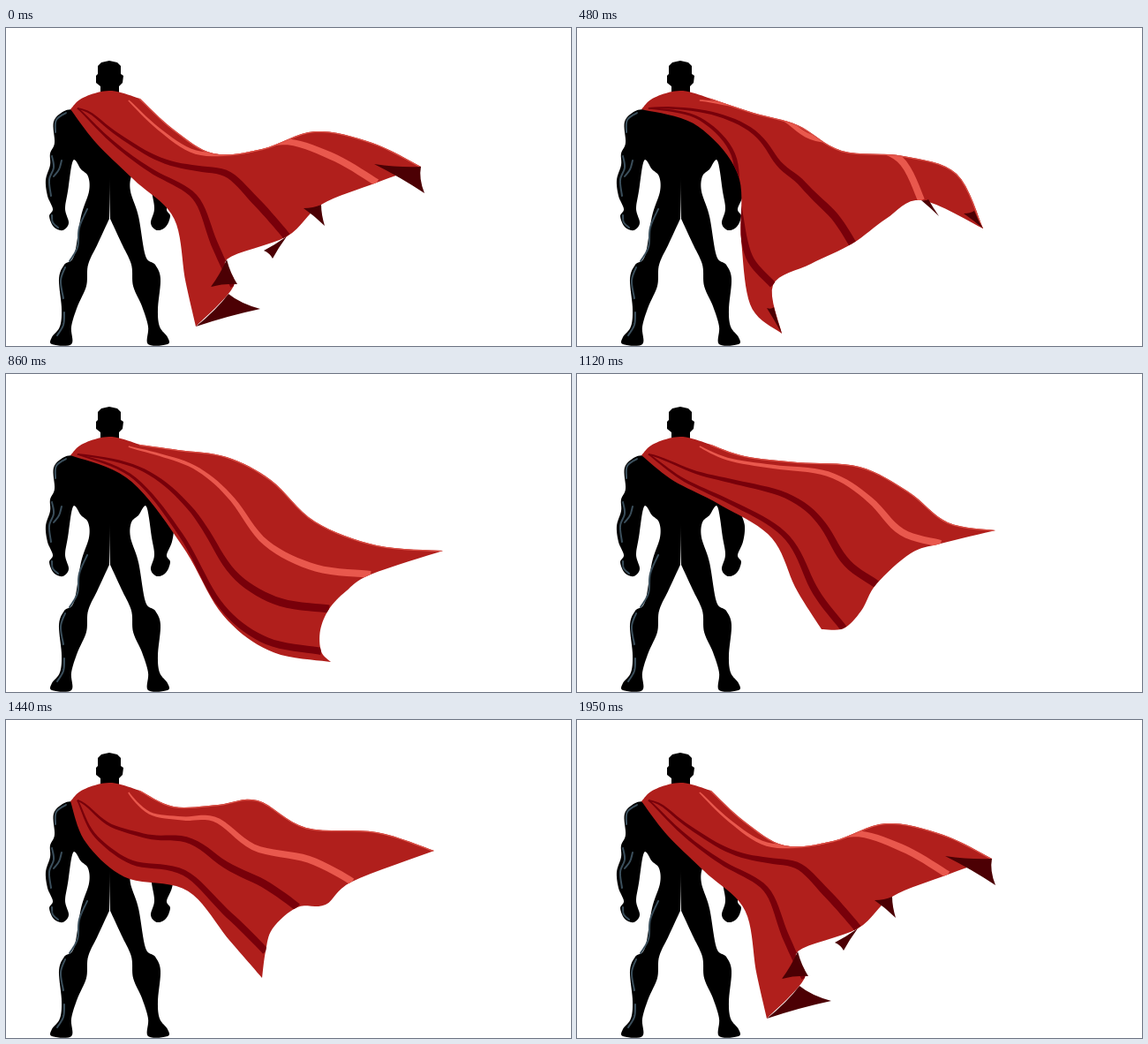
Recreate the animation shown at these times as an HTML page with a canvas. Size 640 px wide and 360 px high, loop 1.98 s.

```html
<!DOCTYPE html>
<html lang="en">
<head>
<meta charset="utf-8">
<title>Cape in the wind</title>
<style>
  html, body { margin: 0; width: 100%; height: 100%; overflow: hidden; background: #fff; }
  canvas { display: block; width: 640px; height: 360px; }
</style>
</head>
<body>
<canvas id="stage" width="640" height="360"></canvas>
<script>
const LOOP = 1980, CYCLE = 37;
const RED = '#b01f1c', DARK = '#78000a', LIGHT = '#e9584d', UNDER = '#4c0004', RIM = '#3b4f5c';
const ctx = document.getElementById('stage').getContext('2d');
const points = s => s.split(' ').map(p => p.split(',').map(Number));
const mix = (a, b, t) => a.map((v, k) => v + (b[k] - v) * t);

// Cape outline at key moments: five points along the top, seven on the hem
// (far tip to low tip), four back up the side.
// A flap is a hem point and two corners of the lining, relative to it.
const poses = [
  { at: 0,
    line: '190,115 235,142 290,137 350,117 415,130 470,157 420,175 357,200 318,236 250,262 258,292 215,338 203,285 190,215 145,172 102,130',
    flaps: [[0, 4, 30, -53, -3], [2, 4, 24, -20, 4], [3, -16, 25, -26, 16], [4, 12, 28, -18, 31], [6, 73, -20, 37, -37]] },
  { at: 9,
    line: '200,96 250,110 300,139 370,145 430,165 460,227 390,195 350,216 312,244 265,267 222,291 232,346 197,315 186,240 182,165 135,110',
    flaps: [[0, -22, -17, -10, -20], [1, 20, 18, 8, -1], [6, -17, -29, -9, -30]] },
  { at: 17,
    line: '195,86 250,94 300,120 350,167 420,194 495,200 413,227 385,246 366,266 356,290 357,314 368,326 300,314 245,272 200,195 140,120' },
  { at: 21,
    line: '190,93 250,100 320,105 375,133 420,168 474,177 412,192 378,203 339,238 322,268 302,288 277,289 248,243 220,185 160,147 108,120' },
  { at: 27,
    line: '190,98 240,96 285,91 340,122 420,127 485,148 392,183 362,209 330,212 302,236 294,262 290,292 252,248 205,193 135,178 90,138' },
  { at: 33,
    line: '190,110 240,119 310,113 360,121 405,147 442,164 398,190 350,203 304,243 290,258 272,272 270,292 222,245 185,192 130,158 98,125',
    flaps: [[1, -25, -7, -14, -10], [6, 38, -25, 10, -29]] }
];
for (const p of poses) p.line = points(p.line);

const collar = points('73,92 87,79 118,71 152,80');
const leftEnd = collar[0], rightEnd = collar[3];

// Catmull-Rom spline through p as a function of 0..1
function spline(p) {
  const last = p.length - 1;
  return s => {
    const i = Math.min(last - 1, Math.floor(s * last)), u = s * last - i;
    const b = p[i], c = p[i + 1], a = p[i - 1] || b, d = p[i + 2] || c;
    return b.map((v, k) => v + u / 2 * (c[k] - a[k]
      + u * (2 * a[k] - 5 * v + 4 * c[k] - d[k] + u * (3 * (v - c[k]) + d[k] - a[k]))));
  };
}
const sample = (f, n = 48) => Array.from({ length: n + 1 }, (_, i) => f(i / n));
const curve = p => sample(spline(p), p.length * 8);

function trace(p) {
  ctx.beginPath();
  for (const q of p) ctx.lineTo(...q);
}
function fill(p, color) {
  trace(p);
  ctx.closePath();
  ctx.fillStyle = color;
  ctx.fill();
}
function stroke(p, color, width) {
  trace(p);
  ctx.strokeStyle = color;
  ctx.lineWidth = width;
  ctx.stroke();
}

// Strip that widens from the collar to the hem
function ribbon(f, width, color) {
  const side = sign => sample(s => {
    const [x, y] = f(s), a = f(Math.max(0, s - .02)), b = f(Math.min(1, s + .02));
    const dx = b[0] - a[0], dy = b[1] - a[1];
    const h = sign * width / 2 * (.2 + .8 * Math.min(1, s * 1.25)) / Math.hypot(dx, dy);
    return [x - dy * h, y + dx * h];
  });
  fill([...side(1), ...side(-1).reverse()], color);
}

// Triangle with edges drawn in towards its middle
function flap(corners, color) {
  const mid = [0, 1].map(k => corners.reduce((sum, c) => sum + c[k], 0) / 3);
  ctx.beginPath();
  ctx.moveTo(...corners[0]);
  corners.forEach((c, i) => {
    const next = corners[(i + 1) % 3];
    ctx.quadraticCurveTo(...mix(mix(c, next, .5), mid, .25), ...next);
  });
  ctx.fillStyle = color;
  ctx.fill();
}

// Hermite blend between neighbouring poses, closed over the cycle
function outline(f) {
  const n = poses.length;
  let i = n - 1;
  while (poses[i].at > f) i--;
  const near = [-1, 0, 1, 2].map(k => poses[(i + k + n) % n].line);
  const time = [-1, 0, 1, 2].map(k => poses[(i + k + n) % n].at + CYCLE * Math.floor((i + k) / n));
  const span = time[2] - time[1], u = (f - time[1]) / span, pull = .75 * span;
  const ease = u * u * (3 - 2 * u);
  const leave = pull * u * (1 - u) ** 2 / (time[2] - time[0]);
  const arrive = pull * u * u * (u - 1) / (time[3] - time[1]);
  const [a, b, c, d] = near;
  return b.map((q, j) => q.map((v, k) =>
    v + (c[j][k] - v) * ease + (c[j][k] - a[j][k]) * leave + (d[j][k] - v) * arrive));
}

function drawCape(frame) {
  const f = frame % CYCLE, line = outline(f), hemPoints = line.slice(5, 12);
  const tip = hemPoints[0], low = hemPoints[6];
  const top = spline([rightEnd, ...line.slice(0, 6)]);
  const side = spline([leftEnd, ...line.slice(11).reverse()]);
  const hem = spline(hemPoints);

  // Place on the cloth: s from collar to hem, v from top edge to side
  const cloth = (s, v) => {
    const inner = mix(top(s), side(s), v), flat = mix(tip, low, v), edge = hem(v);
    return inner.map((x, k) => x + (edge[k] - flat[k]) * s);
  };
  const fold = v => s => cloth(s, v + (.9 - v) * (1 - s) ** 6);

  const front = [...curve(collar), ...sample(top), ...sample(hem), ...sample(side).reverse()];
  fill(front, RED);
  ctx.save();
  trace(front);
  ctx.clip();
  ribbon(fold(5 / 6), 8, DARK);
  ribbon(fold(1 / 2), 9, DARK);
  ribbon(s => cloth(s, 1 / 6), 8, LIGHT);
  stroke(sample(top), '#dc5248', 2.5);
  ctx.restore();

  // The lining shows only around the poses that turn it out
  for (const { at, flaps = [] } of poses) {
    const gap = Math.abs(f - at), open = 1 - Math.min(gap, CYCLE - gap) / 3;
    if (open <= 0) continue;
    for (const [i, ax, ay, bx, by] of flaps) {
      const [x, y] = hemPoints[i];
      flap([[x, y], [x + ax * open, y + ay * open], [x + bx * open, y + by * open]], UNDER);
    }
  }
}

// The body is one half, mirrored; the far shoulder slopes away under the cape
const half = '50,142 50,155 45,172 47,190 53,205 49,213 54,225 64,229 71,221 67,205 70,185 76,150 85,160 93,168 94,185 85,213 77,258 66,268 60,284 63,318 61,338 52,350 52,358 74,358 74,338 81,315 91,292 93,268 104,244 117,216';
const near = curve(points('120,70 100,76 82,90 66,94 54,106 55,130 ' + half));
const far = curve(points('120,70 90,82 75,105 62,125 ' + half)).map(([x, y]) => [235 - x, y]);
const head = points('107,74 107,66 102,62 102,54 104,52 104,43 108,39 117,37 126,39 130,43 130,52 133,54 132,62 128,66 128,74');
const rims = [
  '68,96 57,104 56,118', '52,145 54,158 49,172 51,190', '63,150 60,160 54,168', '52,212 53,220 59,226',
  '92,205 83,226 81,248 72,264', '67,271 62,286 65,306', '66,322 65,336 58,348'
].map(s => curve(points(s)));

function draw(frame) {
  ctx.fillStyle = '#fff';
  ctx.fillRect(0, 0, 640, 360);
  for (const shape of [near, far, head]) fill(shape, '#000');
  ctx.lineCap = 'round';
  for (const r of rims) stroke(r, RIM, 2);
  drawCape(frame);
}

// Drawings are held for 30, 30 and 100 ms in turn
let shown = -1;
function tick() {
  const t = performance.now() % LOOP, r = t % 160;
  const frame = 3 * Math.floor(t / 160) + (r < 30 ? 0 : r < 60 ? 1 : 2);
  if (frame !== shown) draw(shown = frame);
  requestAnimationFrame(tick);
}
tick();
</script>
</body>
</html>
```
